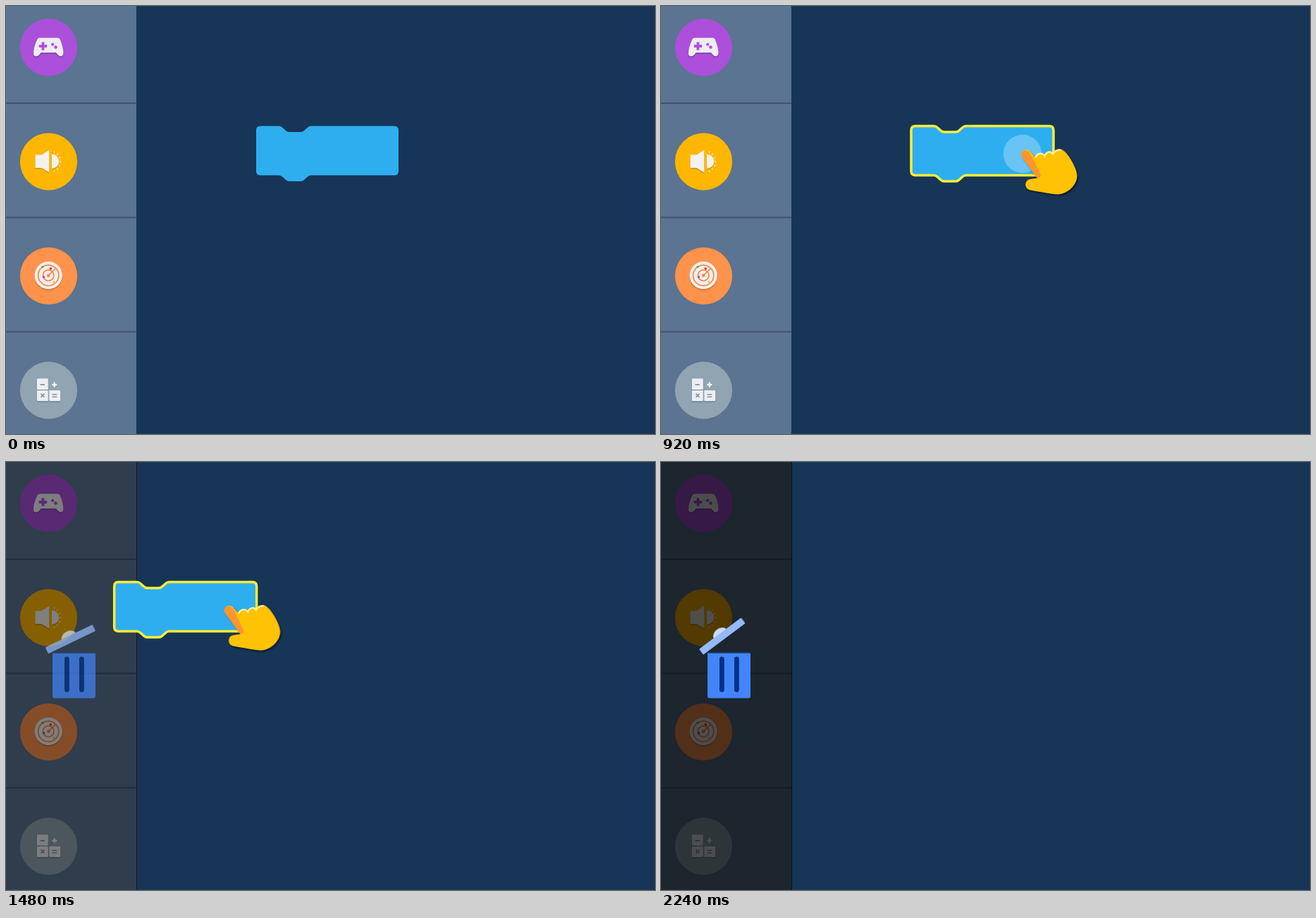
Animation, 921 px wide and 608 px high, one loop 3040 ms. Source, as an HTML page with a canvas:

```html
<!DOCTYPE html>
<html lang="en">
<head>
<meta charset="utf-8">
<title>Drag a block to the trash</title>
<style>
html, body { margin: 0; width: 100%; height: 100%; overflow: hidden; background: #173557; }
canvas { display: block; }
</style>
</head>
<body>
<canvas id="stage" width="921" height="608"></canvas>
<script>
const W = 921, H = 608, LOOP = 3040, STEP = 40;
const ctx = document.getElementById('stage').getContext('2d');

const clamp = v => Math.max(0, Math.min(1, v));
const span = (t, a, b) => clamp((t - a) / (b - a));
const easeOut = (p, n) => 1 - Math.pow(1 - p, n);
const sineOut = p => Math.sin(p * Math.PI / 2);
const sineInOut = p => (1 - Math.cos(p * Math.PI)) / 2;

function layer(w, h, draw) {
  const c = document.createElement('canvas');
  c.width = w;
  c.height = h;
  draw(c.getContext('2d'));
  return c;
}

function disc(g, x, y, r, color) {
  g.fillStyle = color;
  g.beginPath();
  g.arc(x, y, r, 0, Math.PI * 2);
  g.fill();
}

function ring(g, x, y, r, color, width) {
  g.strokeStyle = color;
  g.lineWidth = width;
  g.beginPath();
  g.arc(x, y, r, 0, Math.PI * 2);
  g.stroke();
}

function box(g, x, y, w, h, r, color) {
  g.fillStyle = color;
  g.beginPath();
  g.roundRect(x, y, w, h, r);
  g.fill();
}

function line(g, x1, y1, x2, y2, color, width) {
  g.strokeStyle = color;
  g.lineWidth = width;
  g.beginPath();
  g.moveTo(x1, y1);
  g.lineTo(x2, y2);
  g.stroke();
}

function shade(g, color, dx, dy, blur) {
  g.shadowColor = color;
  g.shadowOffsetX = dx;
  g.shadowOffsetY = dy;
  g.shadowBlur = blur;
}

const noShade = g => shade(g, 'transparent', 0, 0, 0);

// Sidebar icons, drawn around the centre of their circle
function gamepad(g) {
  const pad = new Path2D('M-12.5-13.5H12.5Q15.5-13.5 16.5-10.5Q20.5-1 21 7.5Q20.5 13 16.5 12.8Q14 12 10.5 7.5H-11Q-14 12.4-17 12.8Q-22 13-21.5 7.5Q-21-1-16.5-10.5Q-15.5-13.5-12.5-13.5Z');
  shade(g, 'rgba(70,30,100,.5)', 0, 1.5, 1);
  g.fillStyle = '#eeedf3';
  g.fill(pad);
  noShade(g);
  const c = '#ac4fdb';
  line(g, -13.7, -1.7, -2.3, -1.7, c, 3.8);
  line(g, -8, -7.4, -8, 4, c, 3.8);
  disc(g, 5.7, -4, 2.1, c);
  disc(g, 10, -.2, 2.3, c);
}

function speaker(g) {
  shade(g, 'rgba(150,100,0,.45)', 0, 1.5, 1);
  g.fillStyle = '#f3f2ee';
  g.fill(new Path2D('M-19-9.5H-10L.8-16.5V15.5L-10 9H-19Z'));
  g.fill(new Path2D('M4.5-10.5A10.2 10.2 0 0 1 4.5 10Z'));
  noShade(g);
  for (let i = -3; i <= 3; i++) {
    const a = i * .42, cx = Math.cos(a), sy = Math.sin(a);
    line(g, 4 + 11.5 * cx, 13 * sy, 4 + 14 * cx, 15.5 * sy, '#ffeab0', 1.6);
  }
}

function radar(g) {
  const c = '#f58a45';
  shade(g, 'rgba(140,70,20,.5)', 0, 1.5, 1);
  disc(g, -.3, -.8, 19.6, '#f0efee');
  noShade(g);
  ring(g, -.3, -.8, 14.6, c, 1.7);
  ring(g, -.3, -.8, 7.8, c, 1.7);
  line(g, -.3, -.8, 10.5, -11, c, 1.7);
  disc(g, -.3, -.8, 2.3, c);
  disc(g, -8.5, -13, 1.6, '#35b57a');
  disc(g, 2.8, -10.5, 1.8, '#e5302c');
  disc(g, -7, 1.5, 1.8, '#9a4fd0');
  disc(g, 7.5, 8.5, 1.5, '#ffb52e');
}

function calculator(g) {
  const c = '#8598a4', w = '#eceff2';
  shade(g, 'rgba(70,85,95,.5)', 0, 1.5, 1);
  box(g, -16.5, -16.7, 15.8, 15.7, 1, w);
  box(g, -16.5, .2, 15.8, 15.2, 1, w);
  box(g, .8, .2, 15.8, 15.2, 1, w);
  noShade(g);
  line(g, -12, -8, -5.5, -8, c, 1.8);
  line(g, 4.8, -8, 11.8, -8, '#f4f5f6', 2.3);
  line(g, 8.3, -11.5, 8.3, -4.5, '#f4f5f6', 2.3);
  line(g, -11, 5, -6, 10, c, 1.7);
  line(g, -6, 5, -11, 10, c, 1.7);
  line(g, 5, 6, 11.8, 6, c, 1.6);
  line(g, 5, 9.4, 11.8, 9.4, c, 1.6);
}

const backdrop = layer(W, H, g => {
  g.fillStyle = '#173557';
  g.fillRect(0, 0, W, H);
  g.fillStyle = '#5b7491';
  g.fillRect(0, 0, 185, H);
  const items = [['#ac4fdb', gamepad], ['#ffb600', speaker], ['#ff934b', radar], ['#90a4b1', calculator]];
  items.forEach(([color, icon], i) => {
    const y = 58.7 + i * 162.4;
    disc(g, 60.5, y, 40.6, color);
    g.save();
    g.translate(60.5, y);
    icon(g);
    g.restore();
    if (i < 3) {
      g.fillStyle = '#40546f';
      g.fillRect(0, 137 + i * 162.4, 185, 2);
    }
  });
});

const HAND_X = 500, HAND_Y = 190;
const hand = layer(110, 95, g => {
  g.translate(-HAND_X, -HAND_Y);
  shade(g, 'rgba(10,20,35,.6)', 2, 2.5, 2);
  g.fillStyle = '#ffc205';
  g.fill(new Path2D('M523.5 206.5L531 215Q535 207.5 541 209Q543.500 210 544.500 212Q547 205.500 553 206.500Q555 207.500 556 209Q560 202 568 203.500C576 206 590.500 230 590.500 241C590 257 574 268 562 267.500C553 267 538 264 524 261.500C515 259.500 515.500 247 524 246L534 244.500L512.500 215C508 206 518 200.500 523.500 206.500Z'));
  noShade(g);
  g.fillStyle = '#ff9430';
  g.fill(new Path2D('M521 206.500Q524 209 525.500 212.500L539 240Q539 244 534 244.500L512.500 215C508.500 207.500 515 202 521 206.500Z'));
  g.strokeStyle = '#fff0a2';
  g.lineWidth = 2.4;
  g.lineCap = 'round';
  g.stroke(new Path2D('M531.500 214.500Q535 208.500 541 210Q543.500 211 544.500 213Q547 206.500 553 207.500Q555 208.500 556 210Q559.500 204.500 566 204.500'));
});

const block = new Path2D('M361 170.500H387Q390 170.500 392 172.500L397 177Q399 179 402 179H418Q421 179 423 177L428 172.500Q430 170.500 433 170.500H551Q557 170.500 557 176.500V234.500Q557 240.500 551 240.500H433Q430 240.500 428 242.500L423 247Q421 249 418 249H402Q399 249 397 247L392 242.500Q390 240.500 387 240.500H361Q355 240.500 355 234.500V176.500Q355 170.500 361 170.500Z');

function drawBlock(x, alpha, glow) {
  ctx.save();
  ctx.translate(x, 0);
  ctx.globalAlpha = alpha;
  ctx.fillStyle = '#2eaeef';
  ctx.fill(block);
  ctx.globalAlpha = alpha * glow;
  ctx.strokeStyle = '#ffed38';
  ctx.lineWidth = 3.5;
  ctx.stroke(block);
  ctx.restore();
}

const bin = layer(200, 400, g => {
  box(g, 66, 270.500, 61, 4, 0, '#1f4f9c');
  box(g, 66, 272, 61, 63.500, [0, 0, 3, 3], '#4285fa');
  for (const x of [83, 104]) box(g, x, 276.500, 6.800, 50.500, 3.400, '#013086');
});

const LID_X = 10, LID_Y = 30;
const lid = layer(100, 40, g => {
  g.translate(LID_X, LID_Y);
  g.fillStyle = '#c9ddfb';
  g.beginPath();
  g.ellipse(37, -9.5, 11, 7.5, 0, Math.PI, 0);
  g.fill();
  box(g, 0, -10, 74.500, 10, 1.5, '#94bafc');
});

function drawTrash(open) {
  ctx.save();
  ctx.globalAlpha = open;
  ctx.drawImage(bin, 0, 0);
  ctx.translate(60, 269 + 4.800 * open);
  ctx.rotate(-36.800 * open * Math.PI / 180);
  ctx.drawImage(lid, -LID_X, -LID_Y);
  ctx.restore();
}

function drawHand(x, y, alpha) {
  ctx.globalAlpha = alpha;
  ctx.drawImage(hand, HAND_X + x, HAND_Y + y);
  ctx.globalAlpha = 1;
}

function render(t) {
  const enter = easeOut(span(t, 0, 560), 3.6);
  const tap = span(t, 560, 1080);
  const drag = -314.5 * sineOut(span(t, 1250, 1770));
  const open = sineInOut(span(t, 1240, 1620));
  const leave = Math.pow(span(t, 1760, 2240), 3.5);

  ctx.drawImage(backdrop, 0, 0);
  if (open > 0) {
    ctx.fillStyle = `rgba(0,0,0,${.68 * open})`;
    ctx.fillRect(0, 0, 186, H);
  }
  if (leave < 1) drawBlock(drag, 1 - leave, enter);
  if (tap > 0 && tap < 1) {
    disc(ctx, 513, 210, 28 * easeOut(tap, 3), `rgba(255,255,255,${.52 * (1 - tap * tap)})`);
  }
  if (open > 0) drawTrash(open);
  if (enter > 0 && leave < 1) {
    const away = 80 * (1 - enter);
    drawHand(drag + away + 16 * leave, away + 12 * leave, enter * (1 - leave));
  }
}

const start = performance.now();
function tick() {
  const t = (performance.now() - start) % LOOP;
  render(Math.floor(t / STEP) * STEP);
  requestAnimationFrame(tick);
}
tick();
</script>
</body>
</html>
```
